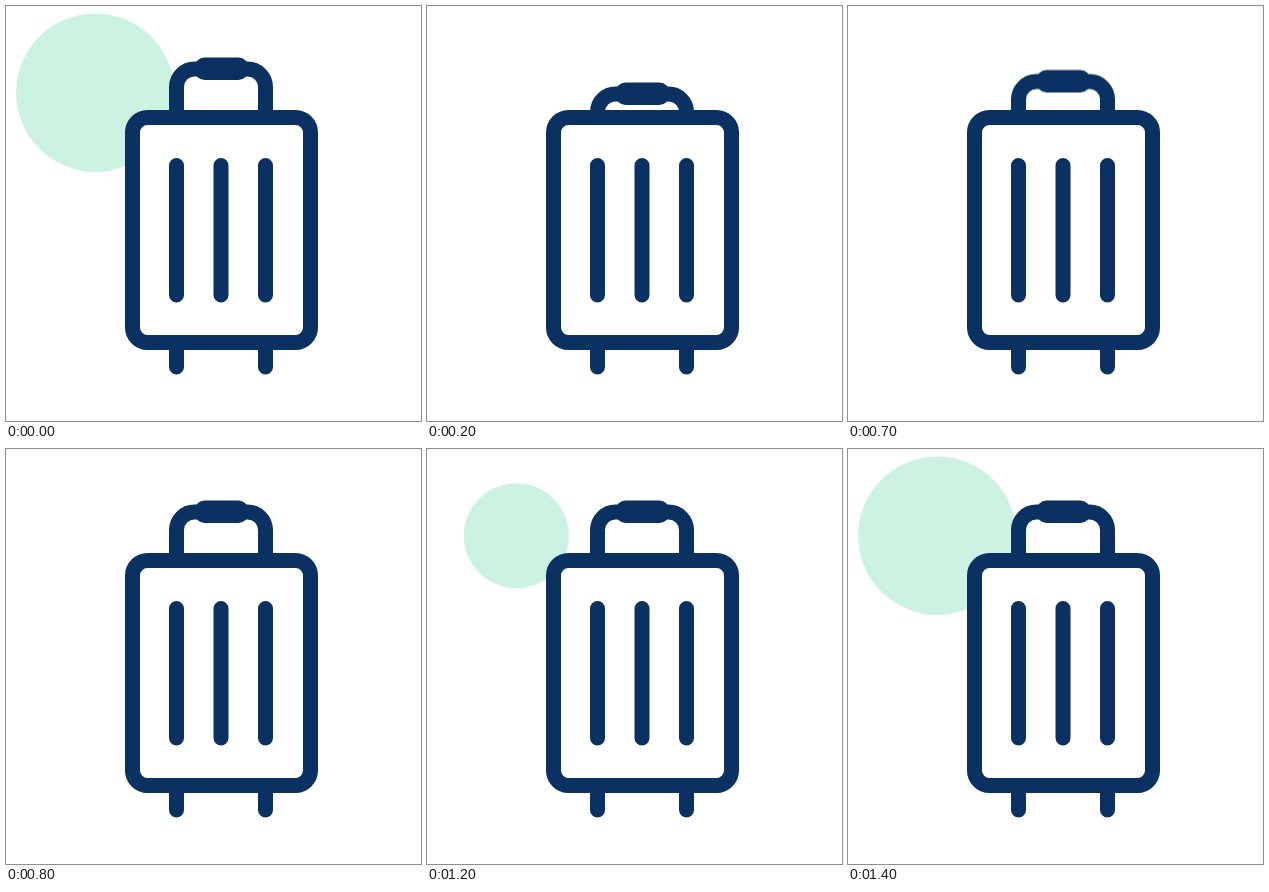
Recreate the animation shown at these times as an HTML page. Size 415 by 415 pixels, loop 1.6 s.

```html
<!DOCTYPE html>
<html lang="en">
<head>
<meta charset="utf-8">
<title>Suitcase</title>
<style>
  html, body { margin: 0; width: 100%; height: 100%; overflow: hidden; background: #fff; }
  svg { display: block; width: 100vw; height: 100vh; }
  .line { fill: none; stroke: #0a3161; stroke-width: 15; stroke-linecap: round; }
  .case { fill: #fff; }
  .grip { fill: #0a3161; }
  .dot { fill: #ccf3e2; transform-origin: 89.3px 86.7px; }

  /* Motion advances in 100 ms ticks (6.25 %) */
  .dot, .handle { animation: 1600ms step-end infinite; }
  .dot { animation-name: grow; }
  .handle { animation-name: slide; }

  @keyframes grow {
    0% { transform: scale(1); }
    6.25% { transform: scale(.5); }
    12.5% { transform: scale(0); }
    68.75% { transform: scale(.325); }
    75% { transform: scale(.663); }
    81.25%, 100% { transform: scale(1); }
  }
  @keyframes slide {
    0% { transform: translateY(0); }
    6.25% { transform: translateY(12.5px); }
    12.5% { transform: translateY(25px); }
    43.75% { transform: translateY(12.5px); }
    50%, 100% { transform: translateY(0); }
  }
</style>
</head>
<body>
<svg viewBox="0 0 415 415">
  <circle class="dot" cx="89.3" cy="86.7" r="79.2"/>
  <g class="handle">
    <path class="line" d="M170.5 111V81A18 18 0 0 1 188.5 63H241.5A18 18 0 0 1 259.5 81V111"/>
    <rect class="grip" x="188.5" y="51.5" width="54" height="22.5" rx="10"/>
  </g>
  <path class="line" d="M170.5 337V361M259.5 337V361"/>
  <rect class="line case" x="126.5" y="111.5" width="178" height="225" rx="15"/>
  <path class="line" d="M170.5 159.5V289M215 159.5V289M259.5 159.5V289"/>
</svg>
</body>
</html>
```
